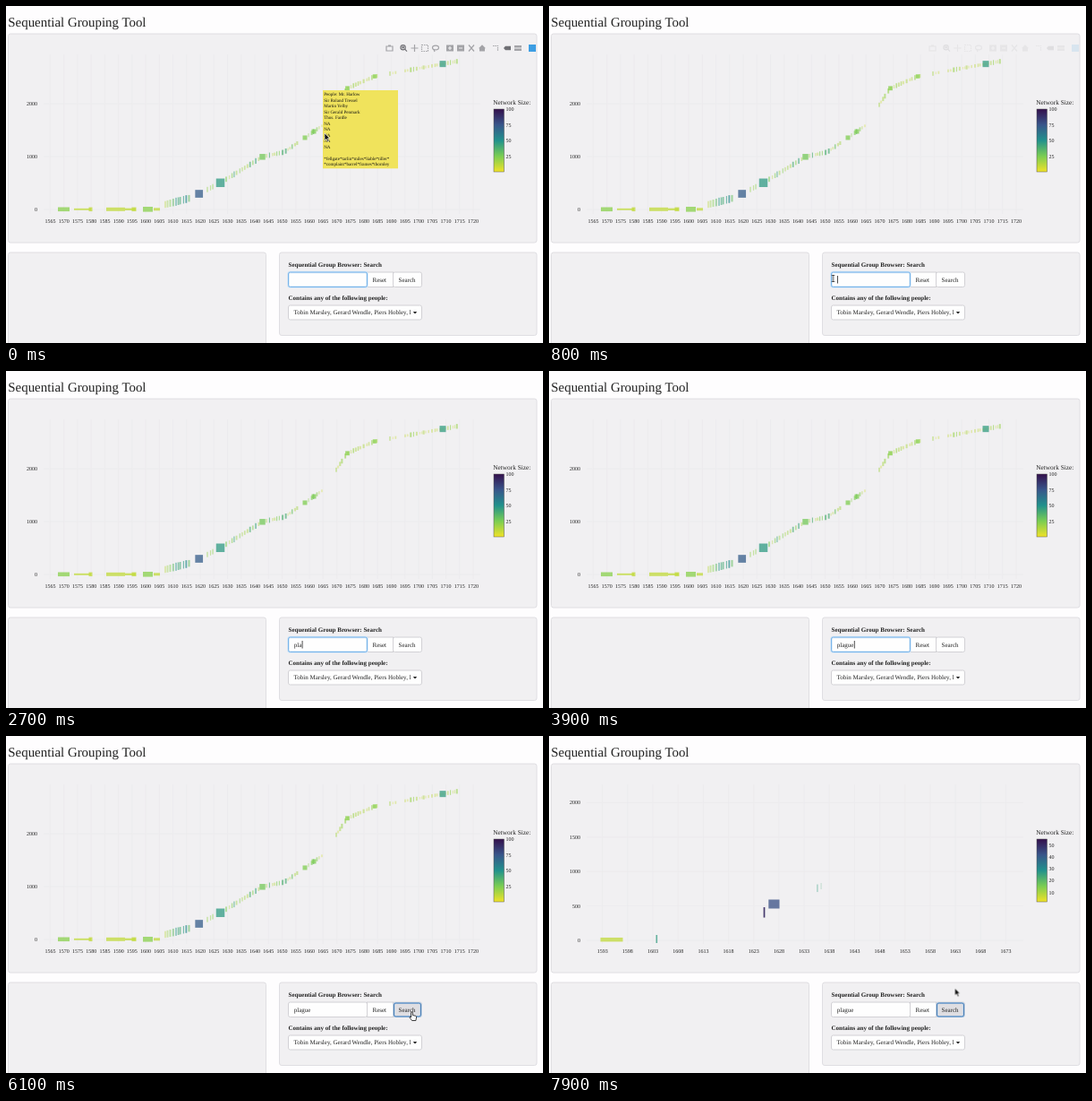
Write an HTML page that moves like this. It is 600 by 376 pixels and loops after 8000 ms.

```html
<!DOCTYPE html>
<html lang="en">
<head>
<meta charset="utf-8">
<title>Sequential Grouping Tool</title>
<style>
html, body { margin: 0; width: 100%; height: 100%; overflow: hidden; background: #fefdfe; }
svg { display: block; width: 600px; height: 376px; }
text { font-family: "Liberation Serif", Times, serif; fill: #222; text-rendering: geometricPrecision; white-space: pre; }
.tick { font-size: 6px; }
.ui { font-size: 7px; }
.bold { font-weight: bold; }
.tip text { font-size: 5.08px; fill: #111; }
.panel { fill: #f1f0f2; stroke: #dfdee2; }
.box { fill: #fefefe; stroke: #d2d1d5; }
.grid { stroke: #ebeaed; stroke-width: .8; }

.step, #all, #some, #tools, #pointer { animation: 8s linear infinite; }
.step { animation-timing-function: step-end; }
#all { animation-name: leave; }
#some { animation-name: arrive; }
#tools { animation-name: fade; }
#pointer { animation-name: travel; }
#tipA { animation-name: tipA; }
#tipB { animation-name: tipB; }
#arrow { animation-name: arrow; }
#beam { animation-name: beam; }
#hand { animation-name: hand; }
#focus { animation-name: focus; }
#press { animation-name: press; }
#caret { animation: blink 1s step-end infinite; }
.typed { animation-name: type; }

@keyframes leave { 0%, 81% { opacity: 1 } 84%, 86.24% { opacity: .3 } 86.25%, 100% { opacity: 0 } }
@keyframes arrive { 0%, 86.24% { opacity: 0 } 86.25%, 100% { opacity: 1 } }
@keyframes fade { 0%, 7.5% { opacity: 1 } 10% { opacity: .14 } 11%, 100% { opacity: 0 } }
@keyframes tipA { 0% { opacity: 1 } 2%, 100% { opacity: 0 } }
@keyframes tipB { 0% { opacity: 0 } 5% { opacity: 1 } 7.5%, 100% { opacity: 0 } }
@keyframes arrow { 0%, 57%, 91% { opacity: 1 } 9%, 68% { opacity: 0 } }
@keyframes beam { 0%, 20%, 57% { opacity: 0 } 9%, 56% { opacity: 1 } }
@keyframes hand { 0%, 91% { opacity: 0 } 68% { opacity: 1 } }
@keyframes focus { 0% { opacity: 1 } 75%, 100% { opacity: 0 } }
@keyframes press { 0% { opacity: 0 } 75%, 100% { opacity: 1 } }
@keyframes blink { 0% { opacity: 0 } 50% { opacity: 1 } }
@keyframes type {
  0% { transform: translateX(0) }
  20% { transform: translateX(3.5px) }
  25% { transform: translateX(5.5px) }
  27.5% { transform: translateX(8.6px) }
  37.5% { transform: translateX(12.1px) }
  40% { transform: translateX(15.6px) }
  42.5%, 100% { transform: translateX(18.8px) }
}
@keyframes travel {
  0%, 1.25% { transform: translate(356px, 142px) }
  6.25%, 7% { transform: translate(267.5px, 207px) }
  9.8%, 56.25% { transform: translate(317.5px, 304px) }
  60.5%, 62% { transform: translate(372px, 262px) }
  70%, 90% { transform: translate(453px, 308px) }
  93.5%, 100% { transform: translate(453.5px, 281.5px) }
}
</style>
</head>
<body>
<svg viewBox="0 0 600 376">
  <defs>
    <linearGradient id="scale" x1="0" y1="1" x2="0" y2="0"></linearGradient>
    <clipPath id="reveal"><rect class="step typed" x="271.5" y="297" width="50" height="17"/></clipPath>
  </defs>

  <text x="2.3" y="23" font-size="14.9">Sequential Grouping Tool</text>
  <rect class="panel" x="2.5" y="31" width="590.5" height="233" rx="2.5"/>
  <rect class="panel" x="2.5" y="275" width="288" height="120" rx="2.5"/>
  <rect class="panel" x="305.5" y="275" width="287.5" height="92.5" rx="2.5"/>

  <g id="all"></g>
  <g id="some"></g>

  <g id="tools" fill="none" stroke="#a3a3a7" stroke-width="1.2">
    <path d="M425 45h7v5h-7zM427 44h3"/>
    <g stroke="#6f6f74"><circle cx="443.6" cy="46.2" r="2.6"/><path d="M445.6 48.2l2.4 2.4M442.2 46.2h2.8M443.6 44.8v2.8"/></g>
    <path d="M452.5 47h8M456.5 43v8"/>
    <rect x="464.5" y="43.5" width="7" height="7" stroke-dasharray="1.5 1"/>
    <ellipse cx="480" cy="46.5" rx="3.5" ry="2.4"/>
    <path d="M478 48.5l1 2.5"/>
    <path d="M492 47h8M504 47h8" stroke-width="7"/>
    <path d="M494 47h4M496 45v4M506 47h4" stroke="#f1f0f2"/>
    <path d="M517 43.5l6 7M523 43.5l-6 7"/>
    <path d="M528 47.2l4-4 4 4h-1v3.300h-6v-3.300z" fill="#a3a3a7" stroke="none"/>
    <path d="M544 44.5h5.5v5.5" stroke-dasharray="1.5 .8"/>
    <path d="M556 47l2-2.300h6v4.600h-6z" fill="#6f6f74" stroke="none"/>
    <path d="M568 45.200h8M568 48.800h8" stroke-width="2.400"/>
    <rect x="584" y="43" width="8" height="8" fill="#3d9ee3" stroke="none"/>
  </g>

  <text class="ui bold" x="315.5" y="291">Sequential Group Browser: Search</text>
  <rect class="box" x="315.5" y="297" width="88" height="16.5" rx="2"/>
  <rect class="box" x="403.5" y="297" width="29" height="16.5"/>
  <rect class="box" x="432.5" y="297" width="32" height="16.5" rx="2"/>
  <g id="press" class="step">
    <rect x="433.5" y="298" width="30" height="15" rx="2" fill="#dfdee2" stroke="#b4d0ec" stroke-width="2.2"/>
    <rect x="433.5" y="298" width="30" height="15" rx="2" fill="none" stroke="#4a7db3"/>
  </g>
  <text class="ui" x="409.5" y="308">Reset</text>
  <text class="ui" x="438.5" y="308">Search</text>
  <g clip-path="url(#reveal)"><text class="ui" x="321.8" y="307.5">plague</text></g>
  <g id="focus" class="step" fill="none">
    <rect x="315.5" y="297" width="88" height="16.5" rx="2" stroke="#d3e6f7" stroke-width="2.4"/>
    <rect x="315.5" y="297" width="88" height="16.5" rx="2" stroke="#78b5ea"/>
    <g id="caret"><rect class="step typed" x="322" y="301" width=".8" height="8.5" fill="#222"/></g>
  </g>
  <text class="ui bold" x="315.5" y="328">Contains any of the following people:</text>
  <rect class="box" x="315.5" y="334" width="149" height="16" rx="2"/>
  <text class="ui" x="321.5" y="344.3">Tobin Marsley, Gerard Wendle, Piers Hobley, l</text>
  <path d="M454.8 341h4.4l-2.2 2.4z" fill="#222"/>

  <g id="tipA" class="tip step"></g>
  <g id="tipB" class="tip step"></g>

  <g id="pointer">
    <path id="arrow" class="step" d="M0 0v8l1.9-1.7 1.3 2.9 1.4-.6-1.3-2.8h2.5z" fill="#111" stroke="#fff" stroke-width=".6"/>
    <path id="beam" class="step" d="M-1.5-3.500h3M0-3.500v7M-1.5 3.500h3" stroke="#222" stroke-width=".9"/>
    <path id="hand" class="step" d="M.2 0q1-.4 1.2.7v2.800l3.300.8q1 .4.9 1.600l-.7 3.600h-4.300l-2.500-3.300q-.3-1.200 1.100-.7l.4.500v-5.200z" fill="#fff" stroke="#111" stroke-width=".8"/>
  </g>
</svg>

<script>
const $ = id => document.getElementById(id);

function add(parent, tag, attrs, label) {
  const el = document.createElementNS("http://www.w3.org/2000/svg", tag);
  for (const key in attrs) el.setAttribute(key, attrs[key]);
  if (label !== undefined) el.textContent = label;
  return parent.appendChild(el);
}

// Reversed viridis: 0 is yellow, 1 is purple.
const stops = [[240, 226, 40], [122, 205, 82], [33, 145, 140], [56, 85, 138], [52, 16, 76]];
const last = stops.length - 1;
function shade(v) {
  const i = Math.min(Math.floor(v * last), last - 1);
  return `rgb(${stops[i].map((c, k) => Math.round(c + (stops[i + 1][k] - c) * (v * last - i)))})`;
}
stops.forEach((c, i) => add($("scale"), "stop", { offset: i / last, "stop-color": `rgb(${c})` }));

function frame(g, xs, ys, key) {
  for (let i = 0; i < xs.count; i++) {
    const x = xs.at + i * xs.gap;
    add(g, "path", { class: "grid", d: `M${x} 54V232` });
    add(g, "text", { class: "tick", x, y: 242, "text-anchor": "middle" }, xs.from + i * 5);
  }
  for (let i = 0; i < ys.count; i++) {
    const y = ys.at - i * ys.gap;
    add(g, "path", { class: "grid", d: `M42 ${y}H530` });
    add(g, "text", { class: "tick", x: 35, y: y + 2, "text-anchor": "end" }, i * ys.by);
  }
  add(g, "text", { x: 544.3, y: 110, "font-size": 7.3 }, "Network Size:");
  add(g, "rect", { x: 545, y: 115, width: 11.5, height: 70, fill: "url(#scale)", stroke: "#555", "stroke-width": .5 });
  for (let i = 0; i < key.count; i++)
    add(g, "text", { class: "tick", x: 558.5, y: key.at - i * key.gap + 2 }, (i + 1) * key.by);
}

// A bar centred on x, y.
function bar(g, x, y, width, height, v, opacity = .75) {
  add(g, "rect", { x: x - width / 2, y: y - height / 2, width, height, fill: shade(v), opacity });
}

const [all, some] = [$("all"), $("some")];
frame(all, { at: 49.4, gap: 15.245, count: 32, from: 1565 }, { at: 227, gap: 59, count: 3, by: 1000 },
  { at: 167.5, gap: 17.5, count: 4, by: 25 });
frame(some, { at: 59.7, gap: 28.17, count: 17, from: 1593 }, { at: 228, gap: 38.4, count: 5, by: 500 },
  { at: 174.5, gap: 13.1, count: 5, by: 10 });

const trend = [[172, 223], [207, 214], [240, 197], [287, 168], [311, 163], [354, 133], [381, 92], [412, 78.5], [508, 61]];
function level(x) {
  const i = trend.findIndex(p => p[0] >= x), [a, b] = [trend[i - 1], trend[i]];
  return a[1] + (b[1] - a[1]) * (x - a[0]) / (b[0] - a[0]);
}

let seed = 7;
const rand = () => (seed = seed * 16807 % 2147483647) / 2147483647;

// Thin bars along the trend: tall and bluish early, short and pale late.
const runs = [[178, 207], [225, 234], [246, 283], [291, 327], [338, 354], [369, 416], [429, 436], [446, 506]];
for (const [from, to] of runs) {
  for (let x = from; x < to; x += 2 + rand() * 1.8) {
    const r = rand(), early = Math.exp((178 - x) / 60), late = x > 350;
    const v = late ? .06 + r * .14 : .12 + r * r * .3 + early * r * .25;
    bar(all, x, level(x), 1 + rand() * 1.2, 2.5 + early * 5 + r * 3, v, late ? .3 + r * .3 : .35 + r * .35);
  }
}

// Wide clusters on the trend: x, size, value.
[[215.7, 8.7, .72], [239.5, 9.5, .46], [286.5, 6.5, .27], [334, 5, .24], [344, 5, .24], [381.5, 4.8, .22], [412, 4.5, .22],
  [488, 7, .45]].forEach(([x, size, v]) => bar(all, x, level(x), size, size, v));

// Earliest clusters along zero: start, end, height.
[[58, 71, 4.6], [76, 95, 2], [92.5, 96.5, 4.5], [112, 133, 4], [133, 145, 2.4], [140.5, 145.5, 4.5], [153, 164, 5.6], [165, 172, 3]]
  .forEach(([a, b, h]) => bar(all, (a + b) / 2, 226.8, b - a, h, h > 4.5 ? .22 : .1));

// Search hits.
bar(some, 70, 227.2, 25, 4.5, .1);
bar(some, 120.3, 226.5, 1.6, 9, .45);
bar(some, 240.5, 196.8, 1.7, 11.5, .92, .9);
bar(some, 251.4, 187.5, 12.2, 10, .77);
bar(some, 299.9, 169.8, 1.4, 8.5, .45, .4);
bar(some, 304.1, 167.5, 1.4, 7, .4, .2);

function tip(g, x, y, width, fill, lines) {
  add(g, "rect", { x, y, width, height: 87.3, fill });
  lines.forEach((line, i) => add(g, "text", { x: x + 1.2, y: y + 6.4 + i * 6.5 }, line));
}
tip($("tipA"), 354, 94, 84, "#f0e35c", ["People: Mr. Harlow", "Sir Roland Tressel", "Martin Yelby", "Sir Gerald Penmark",
  "Thos. Fardle", "NA", "NA", "NA", "NA", "NA", "", "*fellgate*tarlin*miles*liable*tiller*", "*complaint*barrel*frames*thornley"]);
tip($("tipB"), 267.5, 140.2, 97.5, "#94cf78", ["People: Dray", "Surveyor of the Navy", "Sir Martin Pellingby", "Sir Robert Marlowby",
  "Officers of Navy", "Council", "Mayor and Recorder of Ashmere", "Admiralty", "Sir Giles Farn", "Sir Walter Tye", "",
  "*pellingby*marlowby*dray*fawning*officers*", "*cordelo*admiralty*navy"]);
</script>
</body>
</html>
```
